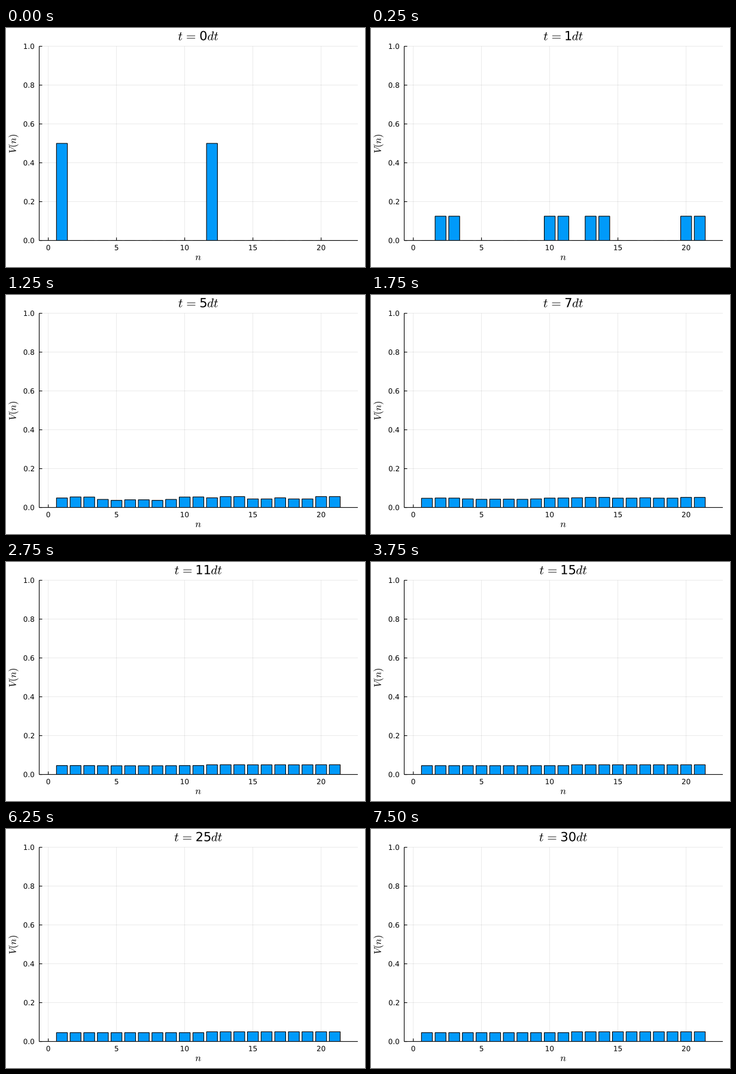
Recreate the animation shown at these times as a matplotlib script. Size 600 by 400 pixels, loop 7750 ms.

```python
import numpy as np
import matplotlib.pyplot as plt
from matplotlib.animation import FuncAnimation
from matplotlib.patches import PathPatch, Rectangle
from matplotlib.path import Path
from matplotlib.textpath import TextPath
from matplotlib.transforms import Affine2D

plt.rcParams["font.family"] = "DejaVu Sans"
plt.rcParams["mathtext.fontset"] = "cm"

WIDTH, HEIGHT, DPI = 600, 400, 100
STEPS, INTERVAL = 31, 250
LEFT, RIGHT, TOP, BOTTOM = 55.5, 588, 30.6, 355.6
X0, X_UNIT = 70.67, 22.8
CENTER = 321.2
TICK_SIZE, GUIDE_SIZE, TITLE_SIZE = 12, 16.5, 21
PX = 72 / DPI
LINE = 1.1 * PX


def px(n):
    return X0 + X_UNIT * n


def py(v):
    return BOTTOM - (BOTTOM - TOP) * v


def diffuse(p):
    """One step of a walk on a ring, hopping one or two sites either way."""
    return sum(np.roll(p, k) for k in (-2, -1, 1, 2)) / 4


def walk(steps):
    rings = [np.eye(size)[0] / 2 for size in (11, 10)]
    states = []
    for _ in range(steps):
        states.append(np.concatenate(rings))
        rings = [diffuse(ring) for ring in rings]
    return states


def glyphs(text, size):
    return TextPath((0, 0), text, size=size)


def place(path, x, y, align=0.0, angle=0):
    """Put the inked part of a text at x, with its baseline on y."""
    box = path.get_extents()
    shift = -(box.x0 + align * box.width)
    move = Affine2D().translate(shift, 0).scale(1, -1)
    return path.transformed(move.rotate_deg(angle).translate(x, y))


def title_path(t):
    em = TITLE_SIZE
    digits = glyphs(str(t), em)
    tail = glyphs("$dt$", em)
    digits_x = 1.741 * em
    tail_x = digits_x + digits.get_extents().width + 0.1 * em
    left = CENTER - (tail_x + tail.get_extents().width) / 2
    parts = [(glyphs("$t$", em), 0), (glyphs("$=$", em), 0.675 * em),
             (digits, digits_x), (tail, tail_x)]
    return Path.make_compound_path(
        *[place(path, left + x, 20.4) for path, x in parts])


fig = plt.figure(figsize=(WIDTH / DPI, HEIGHT / DPI), dpi=DPI, facecolor="white")
ax = fig.add_axes([0, 0, 1, 1])
ax.set_xlim(0, WIDTH)
ax.set_ylim(HEIGHT, 0)
ax.axis("off")


def line(x1, y1, x2, y2, width=LINE, alpha=1.0, z=2):
    ax.plot([x1, x2], [y1, y2], color="black", lw=width, alpha=alpha,
            zorder=z, snap=False, solid_capstyle="butt")


def ink(path):
    patch = PathPatch(path, facecolor="black", lw=0, zorder=5)
    ax.add_patch(patch)
    return patch


for n in range(0, 21, 5):
    x = px(n)
    line(x, TOP, x, BOTTOM, 0.8 * PX, 0.1, 1)
    line(x, BOTTOM, x, BOTTOM - 5)
    ink(place(glyphs(str(n), TICK_SIZE), x, 371.8, 0.5))

for k in range(6):
    y = py(k / 5)
    line(LEFT, y, RIGHT, y, 0.8 * PX, 0.1, 1)
    line(LEFT, y, LEFT + 5, y)
    ink(place(glyphs(f"{k / 5:.1f}", TICK_SIZE), 47, y + 4.4, 1))

line(LEFT, BOTTOM, RIGHT, BOTTOM)
line(LEFT, BOTTOM, LEFT, TOP)
ink(place(glyphs("$n$", GUIDE_SIZE), CENTER, 388.4, 0.5))
ink(place(glyphs("$V(n)$", GUIDE_SIZE), 16.6, 193.8, 0.5, -90))

states = walk(STEPS)
title = ink(title_path(0))
plot_area = Rectangle((LEFT, TOP), RIGHT - LEFT, BOTTOM - TOP,
                      transform=ax.transData)
bars = []
for n in range(1, 22):
    bar = Rectangle((px(n - 0.4), BOTTOM), 0.8 * X_UNIT, 0, facecolor="#009afa",
                    edgecolor="black", lw=LINE, zorder=3, snap=False)
    ax.add_patch(bar)
    bar.set_clip_path(plot_area)
    bars.append(bar)


def update(t):
    for bar, value in zip(bars, states[t]):
        bar.set_height(py(value) - BOTTOM)
    title.set_path(title_path(t))
    return [*bars, title]


anim = FuncAnimation(fig, update, frames=STEPS, interval=INTERVAL, repeat=True)
plt.show()
```
